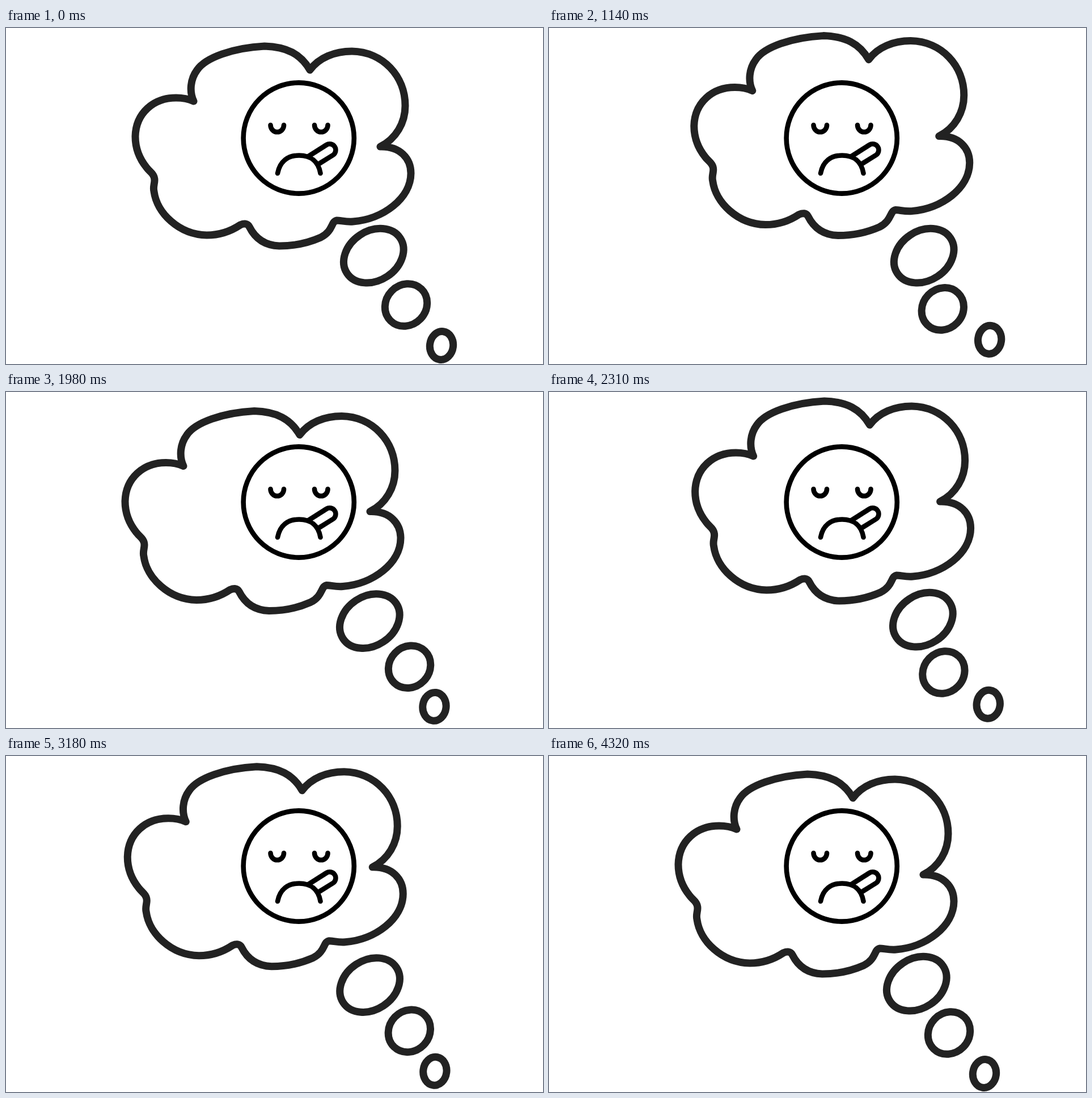
Write an HTML page that moves like this. It is 947 px wide and 592 px high and loops after 4.86 s.

```html
<!DOCTYPE html>
<html lang="en">
<head>
<meta charset="utf-8">
<title>Thought bubble</title>
<style>
  html, body { margin: 0; width: 100%; height: 100%; overflow: hidden; background: #fff; }
  svg { display: block; width: 947px; height: 592px; fill: none; stroke-linecap: round; stroke-linejoin: round; }
  .bubble { stroke: #222; stroke-width: 13; }
  .face { stroke: #000; stroke-width: 8.6; }
</style>
</head>
<body>
<svg viewBox="0 0 947 592">
  <g class="bubble">
    <path id="cloud" d="M331 129C323 112 325 90 337 74C352 52 400 35 456 32C495 33 520 46 536 74
      C552 52 580 41 610 41C665 42 704 85 704 137C704 167 688 195 660 209
      C695 208 714 230 714 256C714 300 665 337 612 341C600 342 590 339 583 339
      C573 341 577 358 555 369C530 380 505 384 482 384C452 383 437 366 429 350
      C426 344 420 344 413 347C395 359 375 365 354 365C305 364 266 326 261 288
      C259 280 262 275 262 268C262 257 253 253 248 246C235 230 228 212 228 191
      C229 150 260 123 300 123C312 123 322 125 331 129Z"/>
    <g id="big"><ellipse rx="56.2" ry="43.7" transform="translate(648.3 401.2) rotate(-33.4)"/></g>
    <g id="middle"><ellipse rx="39" ry="35.4" transform="translate(705.5 488) rotate(-46)"/></g>
    <g id="small"><ellipse rx="20.6" ry="25" transform="translate(768 559.5) rotate(7)"/></g>
  </g>
  <g class="face">
    <circle cx="516.2" cy="194" r="97.6"/>
    <path d="M466.5 171a11.75 12.3 0 0 0 23.5 0M544 171a11.75 12.3 0 0 0 23.5 0"/>
    <path d="M479 256C483 235 497 224.5 517 224.5S551 235 554.5 256"/>
    <path d="M533.5 226L565 206A10.6 10.6 0 0 1 576.5 224L551.5 239.5"/>
  </g>
</svg>
<script>
  const LOOP = 4860, LEG = 864, STEP = LEG / 15;

  // Turning points: rest, right, left, right, left, rest.
  const cloudTurns = [[0, 0], [39.5, -25], [-31.5, 5], [50, -26], [-35, -12], [0, 0]];
  const smallTurns = [[0, 0], [14.5, -11.5], [-18, -4], [15, -11], [-20.5, -2], [0, 0]];
  const swayTurns = [[0], [15.5], [-10.5], [16.3], [-13.2], [0]];

  const ease = p => (1 - Math.cos(Math.PI * p)) / 2;

  function move(id, x, y) {
    document.getElementById(id).setAttribute("transform", `translate(${x.toFixed(2)} ${y.toFixed(2)})`);
  }

  function draw(time) {
    const legs = Math.min(Math.floor(time / STEP) * STEP / LEG, 5);
    const leg = Math.min(Math.floor(legs), 4);
    const s = ease(legs - leg);
    const between = turns => turns[leg].map((from, i) => from + (turns[leg + 1][i] - from) * s);

    const [x, y] = between(cloudTurns);
    const sag = 12 * s * (1 - s);
    move("cloud", x, y + sag);
    move("small", ...between(smallTurns));

    // The two upper bubbles sway against each other.
    const [sway] = between(swayTurns);
    move("big", 1.15 * sway, Math.max(0, -0.4 * sway));
    move("middle", -sway, 0.62 * sway);
  }

  const start = performance.now();
  function tick() {
    draw((performance.now() - start) % LOOP);
    requestAnimationFrame(tick);
  }
  tick();
</script>
</body>
</html>
```
